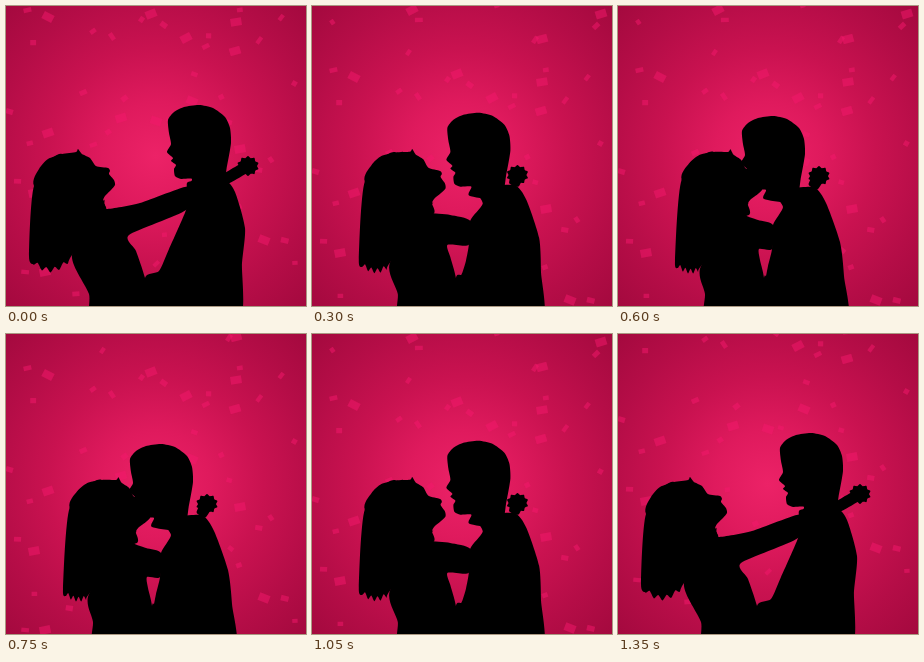
These frames come from a looping animation (300 by 300 pixels, 1500 ms). An HTML page with a canvas:

```html
<!DOCTYPE html>
<html lang="en">
<head>
<meta charset="utf-8">
<title>Kissing couple</title>
<style>
html, body { margin: 0; width: 100%; height: 100%; overflow: hidden; background: #a80a40; }
canvas { display: block; width: 300px; height: 300px; }
</style>
</head>
<body>
<canvas id="stage" width="300" height="300"></canvas>
<script>
const ctx = document.getElementById('stage').getContext('2d');
const STEP = 150;

const parse = text => text.trim().split(/\s+/).map(p => p.split(',').map(Number));
const lerp = (a, b, t) => a + (b - a) * t;
const between = (p, q, t) => p.map((v, i) => lerp(v, q[i], t));

// Heads in profile: hers around the chin, his around the nose
const herHead = parse(`-81,1 -76,-16 -67,-26 -53,-31 -39,-33 -37,-36 -33,-31 -25,-27 -19,-19 -7,-17
  -5,-14 -6,-11 -1,-5 0,0 -4,5 -10,11 -12,16 -10,27 -50,40`);
const hisHead = parse(`32,-47 17,-45 7,-40 1,-32 2,-19 4,-8 0,0 6,6 4,9 9,13 7,17 8,24 14,27 25,27
  23,36 54,39 60,14 64,-9 63,-24 58,-35 46,-44`);

// The two ends of the embrace; every other pose lies between them
const apart = {
  chin: [109, 179], nose: [161, 146], tilt: [0],
  hair: parse('23,250 66,249'), sag: [12],
  waist: parse('83,288 86,320'), belly: parse('139,272 130,245 123,229'), shoulder: parse('134,197 100,203'),
  chest: parse('182,176 184,190'), front: parse('163,243 153,265'),
  back: parse('231,320 236,257 239,222 229,186 218,174'),
  reach: parse('180,204 184,180'), hand: [242, 160]
};
const kiss = {
  chin: [144, 184], nose: [123, 157], tilt: [8],
  hair: parse('57,255 83,260'), sag: [5],
  waist: parse('87,288 88,320'), belly: parse('146,272 142,254 141,243'), shoulder: parse('140,214 125,208'),
  chest: parse('157,186 165,201'), front: parse('150,260 148,270'),
  back: parse('227,320 226,270 222,236 208,197 195,181'),
  reach: parse('154,243 155,219'), hand: [201, 170]
};

// Arm and hand close in faster than the bodies
function poseAt(t) {
  const pose = {};
  for (const key in apart) {
    const k = key === 'reach' || key === 'hand' ? Math.sin(t * Math.PI / 2) : t;
    const a = apart[key], b = kiss[key];
    pose[key] = Array.isArray(a[0]) ? a.map((p, i) => between(p, b[i], k)) : between(a, b, k);
  }
  return pose;
}

// Closed soft curve through all points
function addCurve(path, pts) {
  const n = pts.length, k = 0.11;
  const at = i => pts[(i + n) % n];
  const blob = new Path2D();
  blob.moveTo(...pts[0]);
  for (let i = 0; i < n; i++) {
    const [a, b, c, d] = [at(i - 1), at(i), at(i + 1), at(i + 2)];
    blob.bezierCurveTo(
      b[0] + (c[0] - a[0]) * k, b[1] + (c[1] - a[1]) * k,
      c[0] - (d[0] - b[0]) * k, c[1] - (d[1] - b[1]) * k, ...c);
  }
  blob.closePath();
  path.push(blob);
}

function place(pts, [x, y], degrees = 0) {
  const c = Math.cos(degrees * Math.PI / 180), s = Math.sin(degrees * Math.PI / 180);
  return pts.map(([u, v]) => [x + u * c - v * s, y + u * s + v * c]);
}

// Ragged hair ends between two points
function strands([from, to], sag) {
  return Array.from({ length: 11 }, (_, i) => {
    const [x, y] = between(from, to, i / 10);
    return [x, y + sag * Math.sin(i / 10 * Math.PI) + (i % 2 ? 5 : 0)];
  });
}

// A fist with knuckles
function fist([x, y]) {
  return Array.from({ length: 20 }, (_, i) => {
    const a = i / 20 * 2 * Math.PI, r = i % 2 ? 1 : 0.82;
    return [x + 11 * r * Math.cos(a), y + 10 * r * Math.sin(a)];
  });
}

function buildCouple(t) {
  const p = poseAt(t), shapes = [];
  const head = place(herHead, p.chin, p.tilt[0]);
  const [under, over] = p.reach;
  const nape = p.back[p.back.length - 1];
  const dx = nape[0] - p.hand[0], dy = nape[1] - p.hand[1];
  const len = Math.hypot(dx, dy), nx = -dy / len * 5, ny = dx / len * 5;

  addCurve(shapes, head);
  addCurve(shapes, [head[0], ...strands(p.hair, p.sag[0]), p.shoulder[1], head[3]]);
  addCurve(shapes, [p.hair[1], ...p.waist, [150, 320], ...p.belly, under, over, ...p.shoulder, head[16]]);
  addCurve(shapes, place(hisHead, p.nose));
  addCurve(shapes, [...p.chest, over, under, ...p.front, p.belly[0], [138, 320], ...p.back]);
  addCurve(shapes, fist(p.hand));
  addCurve(shapes, [
    [p.hand[0] + nx, p.hand[1] + ny], [p.hand[0] - nx, p.hand[1] - ny],
    [nape[0] - nx, nape[1] - ny], [nape[0] + nx, nape[1] + ny]]);
  return shapes;
}

function seeded(seed) {
  return () => (seed = seed * 16807 % 2147483647) / 2147483647;
}

// A few large pieces, then a loose scatter of small ones
const rand = seeded(2024);
const confetti = parse(`180,62 230,3 230,46 28,217 234,173 42,157 229,75 100,-26 186,125 150,145
  115,142 39,296 258,264 42,41 289,-22 145,38`)
  .map(([x, y]) => ({ x, y, w: 11, h: 8, turn: rand() - 0.5 }));
for (let row = 0; row < 8; row++) {
  for (let col = 0; col < 6; col++) {
    confetti.push({
      x: (col + rand()) * 50, y: (row + rand()) * 45 - 40,
      w: 5 + rand() * 3, h: 4 + rand() * 1.5, turn: rand() * 2 - 1
    });
  }
}

const couples = [0, 0.32, 0.7, 1].map(buildCouple);

// Couple and confetti drop for each step of the loop
const steps = [
  [0, -30], [1, 0], [2, 30], [3, 0], [3, 30],
  [3, 0], [3, -30], [2, 30], [1, 0], [0, -50]
];

const glow = ctx.createRadialGradient(150, 150, 0, 150, 150, 215);
['#ec2267', '#df1a5d', '#c91250', '#b50d47', '#a3093e']
  .forEach((color, i) => glow.addColorStop(i / 4, color));

function draw([couple, drop]) {
  ctx.fillStyle = glow;
  ctx.fillRect(0, 0, 300, 300);
  ctx.fillStyle = 'rgba(243, 24, 108, 0.5)';
  for (const { x, y, w, h, turn } of confetti) {
    ctx.save();
    ctx.translate(x, y + drop);
    ctx.rotate(turn);
    ctx.fillRect(-w / 2, -h / 2, w, h);
    ctx.restore();
  }
  ctx.fillStyle = '#000';
  couples[couple].forEach(shape => ctx.fill(shape));
}

function tick() {
  draw(steps[Math.floor(performance.now() / STEP) % steps.length]);
  requestAnimationFrame(tick);
}
tick();
</script>
</body>
</html>
```
